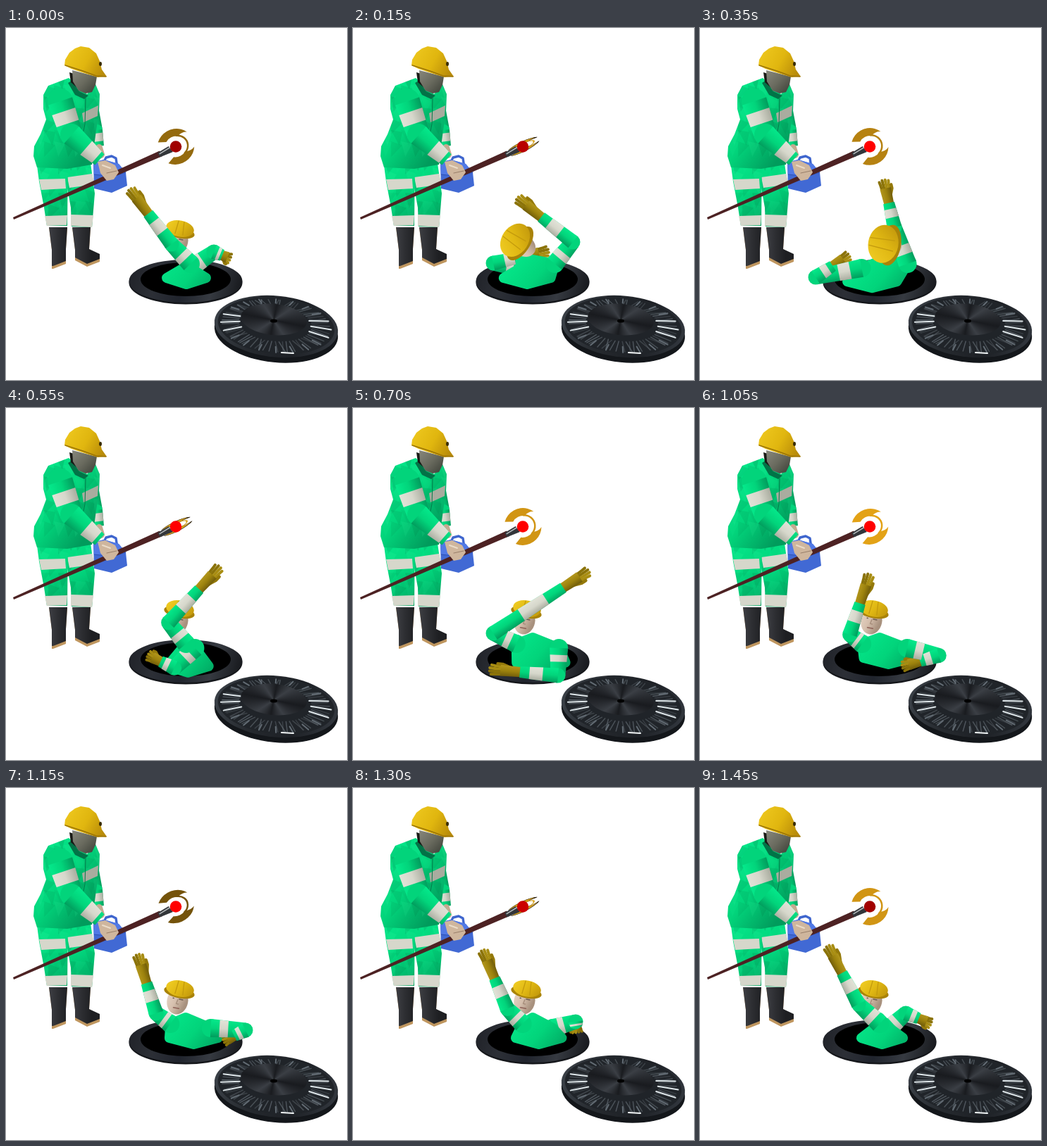
An HTML page with a canvas that plays this animation: 484x500 px, repeating every 1500 ms.

```html
<!DOCTYPE html>
<html lang="en">
<head>
<meta charset="utf-8">
<title>Manhole</title>
<style>
html, body { margin: 0; width: 100%; height: 100%; overflow: hidden; background: #fff; }
canvas { display: block; width: 484px; height: 500px; }
</style>
</head>
<body>
<canvas id="stage" width="484" height="500"></canvas>
<script>
const LOOP = 1500, STEP = 50, TAU = Math.PI * 2;
const GREEN = ['#04e98b', '#02d47b', '#019b5c'];
const TAPE = ['#e2e3d8', '#d6d7cb', '#a9ac9f'];
const stage = document.getElementById('stage').getContext('2d');
const still = document.createElement('canvas');
still.width = 484;
still.height = 500;
let c = still.getContext('2d');

// ---- helpers ----
const points = s => s.split(' ').map(p => p.split(',').map(Number));
const mix = (a, b, k) => a.map((v, i) => v + (b[i] - v) * k);
const dist = (a, b) => Math.hypot(b[0] - a[0], b[1] - a[1]);

function seeded(seed) {
  return () => (seed = (seed * 16807) % 2147483647) / 2147483647;
}
function trace(pts) {
  c.beginPath();
  (typeof pts === 'string' ? points(pts) : pts).forEach(p => c.lineTo(p[0], p[1]));
}
function poly(fill, pts) {
  c.fillStyle = fill;
  trace(pts);
  c.closePath();
  c.fill();
}
function line(color, width, pts) {
  c.strokeStyle = color;
  c.lineWidth = width;
  c.lineCap = c.lineJoin = 'round';
  trace(pts);
  c.stroke();
}
function oval(fill, x, y, rx, ry, rot = 0) {
  c.fillStyle = fill;
  c.beginPath();
  c.ellipse(x, y, rx, ry, rot, 0, TAU);
  c.fill();
}
function linear(x0, y0, x1, y1, colors) {
  const g = c.createLinearGradient(x0, y0, x1, y1);
  colors.forEach((col, i) => g.addColorStop(i / (colors.length - 1), col));
  return g;
}
// Shaded cloth with faint low-poly facets.
function cloth(pts, x0, y0, x1, y1) {
  const rnd = seeded(77);
  poly(linear(x0, y0, x1, y1, GREEN), pts);
  c.save();
  trace(pts);
  c.clip();
  for (let y = y0 - 20; y < y1 + 20; y += 16) {
    for (let x = x0 - 10; x < x1 + 20; x += 14) {
      const tone = rnd() < 0.6 ? '0,70,40' : '60,255,170';
      poly(`rgba(${tone},${rnd() * 0.16})`, [[x, y], [x + 16, y + 8 * rnd()], [x + 12 * rnd(), y + 22]]);
    }
  }
  c.restore();
}
// Tapered segment, lit from the upper left.
function tube(a, b, wa, wb, colors) {
  const len = dist(a, b) || 1;
  let nx = (a[1] - b[1]) / len, ny = (b[0] - a[0]) / len;
  if (nx + 2 * ny > 0) { nx = -nx; ny = -ny; }
  const off = (p, w) => [p[0] + nx * w, p[1] + ny * w];
  poly(linear(...off(a, wa), ...off(a, -wa), colors), [off(a, wa), off(b, wb), off(b, -wb), off(a, -wa)]);
}
// Sleeve with reflective tape: upper and lower give its place along each half.
function sleeve(s, e, w, [ws, we, ww], upper, lower) {
  oval(GREEN[1], ...s, ws, ws);
  tube(s, e, ws, we, GREEN);
  oval(GREEN[1], ...e, we, we);
  tube(e, w, we, ww, GREEN);
  for (const [a, b, wa, wb, part] of [[s, e, ws, we, upper], [e, w, we, ww, lower]]) {
    const width = k => wa + (wb - wa) * k;
    if (part) tube(mix(a, b, part[0]), mix(a, b, part[1]), width(part[0]), width(part[1]), TAPE);
  }
}

// ---- still parts ----
function drawHole() {
  oval('#15171b', 255, 362, 80.5, 30.5);
  oval(linear(175, 340, 330, 385, ['#202228', '#2c2f36', '#20242d', '#363a41', '#17191d']), 255, 359.5, 80.5, 30.5);
  oval('#000', 255, 357, 64, 24);
}

function drawLid() {
  const x = 383.5, y = 424, rot = 0.1, rnd = seeded(9);
  const at = (a, r) => [x - 3 * (1 - r) + Math.cos(a) * 87 * r, y - 9 * (1 - r) + (Math.sin(a) * 42 + Math.cos(a) * 6) * r];
  oval('#14171b', x, y + 8, 88, 43, rot);
  oval(linear(296, 400, 470, 450, ['#3b4148', '#262a2f', '#1d2025', '#33383f']), x, y, 88, 43.5, rot);
  oval('#202429', x, y - 1, 83, 40, rot);
  for (let i = 0; i < 64; i++) {
    const a = i / 64 * TAU, lean = (rnd() - 0.5) * 0.25;
    line(`rgba(120,130,138,${0.2 + 0.35 * rnd()})`, 1.5, [at(a, 0.6), at(a + lean, 0.88)]);
  }
  for (let i = 0; i < 20; i++) {
    const a = i / 20 * TAU, bright = Math.abs(Math.cos(a)) > 0.94;
    line(bright ? '#dfe7ea' : '#626b73', 2, [at(a, bright ? 0.58 : 0.74), at(a, 0.9)]);
  }
  line('#f2f6f7', 2, '391,461 408,462');
  const g = c.createConicGradient(0.2, 380, 415);
  for (let i = 0; i <= 8; i++) g.addColorStop(i / 8, i % 2 ? '#3b3f45' : '#191b1f');
  oval(g, 380, 414, 47, 22, rot);
  oval('#000', 380, 416, 5, 2.6);
}

function drawBoot(x, base, toe) {
  const shape = dy => [[x, 283], [x + 26, 283], [x + 24, 314], [x + 24 + toe, base - 14 + dy], [x + 24 + toe, base - 7 + dy],
    [x + 6 + toe, base + dy], [x + 4, base - toe * 0.6 + dy], [x + 4, 315]];
  poly('#bf965f', shape(4));
  poly(linear(x, 0, x + 28, 0, ['#3d3e43', '#2c2d31', '#1e1f22']), shape(0));
}

function drawWorker() {
  drawBoot(61, 338, 0);
  drawBoot(94, 335, 15);
  cloth('84,185 119,185 126,235 122,283 93,282 92,255 86,222', 80, 185, 130, 283);
  poly(TAPE[1], '87,212 122,207 126,222 90,227');
  poly(TAPE[1], '92,265 124,266 122,283 92,281');
  cloth('42,180 88,180 87,281 58,281 54,255 47,218', 42, 190, 105, 281);
  poly(TAPE[1], '47,215 84,214 85,228 50,230');
  poly(TAPE[1], '55,267 87,266 86,280 58,281');

  // far arm and tool box
  sleeve([124, 118], [129, 145], [132, 168], [8, 8, 7], null, [0.2, 0.7]);
  line('#c5aa91', 10, '132,170 135,180');
  line('#3f66ce', 3.4, '139,190 142,184 150,182 156,185 158,198');
  poly('#4169d4', '124,191 139,187 160,193 170,205 172,224 150,234 125,228');
  poly('#5179e6', '124,191 139,187 160,193 170,205 151,211 125,208');
  line('#2f51b4', 1, '125,208 151,211 170,205');

  cloth('89,71 60,82 53,95 53,115 57,130 49,151 40,168 39,182 44,198 87,200 122,194 124,176 128,145 132,118 133,94 127,80 115,94', 50, 85, 138, 150);
  poly(TAPE[2], '108,121 131,110 130,125 110,134');
  poly('#027347', '93,75 104,90 117,96 111,101 98,95 88,78');
  line('#017a49', 1, '113,100 112,137 104,172');

  // head
  poly('#191a16', '90,63 100,66 101,85 92,77');
  poly(linear(95, 62, 126, 92, ['#85857a', '#696a5e', '#3f423a']), '94,60 129,69 127,81 122,91 113,93 103,89 95,76');
  poly(linear(88, 36, 138, 64, ['#ecc51c', '#e0b60f', '#b88b09']),
    '83,53 84,45 90,35 98,29 106,26 118,28 128,36 133,47 136,59 143,69 130,70 111,64 93,58');
  line('#9b7407', 1.5, '84,53 109,61 128,68 142,69');
  oval('#3a2d05', 134, 51, 2, 3);

  sleeve([77, 104], [93, 152], [133, 187], [18, 16, 10], [0.3, 0.66], [0.52, 0.9]);

  // staff and hand
  poly(linear(0, 0, 3, 7, ['#6b3836', '#4d2223']), '10,269 218,174.5 222,182 11,272');
  poly('#cfb69d', '130,190 141,188 155,195 160,205 153,215 143,217 134,206');
  line('#9b806c', 1.2, '143,206 157,203');
  line('#eadbc8', 2, '137,195 148,199');
}

// ---- staff head: two turns a loop, flashing as a face swings past ----
function drawStaffHead(t) {
  const spin = (t - 337) / 750 * TAU, turn = Math.cos(spin), edgeOn = Math.abs(turn) < 0.4;
  const lit = 0.62 + 0.33 * Math.sin(-2 * spin + 0.6);
  const gold = edgeOn ? '#d9a21a' : `rgb(${[245, 175, 24].map(v => v * lit | 0)})`;
  const glow = Math.min(255, 290 - 130 * Math.cos(t / LOOP * TAU));
  c.save();
  c.translate(241, 168.5);
  c.rotate(-0.46);
  c.save();
  c.scale(1, Math.max(Math.abs(turn), 0.26));
  for (const side of [-1, 1]) {
    c.save();
    c.scale(1, side);
    c.fillStyle = gold;
    c.beginPath();
    c.arc(0, 0, 26.5, 2.42, 0.48, true);
    c.quadraticCurveTo(18, 16, 9, 13);
    c.arc(0, 0, 15.5, 0.95, 2.2);
    c.fill();
    if (edgeOn) {
      c.strokeStyle = '#1d1302';
      c.lineWidth = 2;
      c.stroke();
    }
    c.restore();
  }
  c.strokeStyle = gold;
  c.lineWidth = 2.5;
  c.beginPath();
  c.arc(2, 0, 15.5, -1.2, 1.2);
  c.stroke();
  c.restore();
  poly('#33363a', '-27,-3.5 -9,-5 -7,5 -27,3.5');
  line('#b4b9bb', 1.5, '-25,-1 -9,-2.5');
  c.restore();
  oval(`rgb(${glow < 255 ? Math.max(160, glow) | 0 : 255},0,0)`, 241, 168.5, 8.3, 8.3);
}

// ---- climber ----
// Key points of both arms: raised elbow and fingertip, lowered elbow and fingertip.
const REACH = [
  [0, '235,307 174,227 295,318 319,328'],
  [150, '312,304 231,240 199,334 280,316'],
  [350, '276,283 260,214 164,354 213,322'],
  [700, '199,320 337,230 291,380 191,371'],
  [900, '212,325 333,233 338,364 248,381'],
  [1150, '213,320 186,234 340,344 308,360'],
  [1450, '225,307 180,222 292,320 329,335']
].map(([at, pts]) => ({ at, pts: points(pts) }));

function reach(t) {
  const i = REACH.findLastIndex(k => k.at <= t), a = REACH[i], b = REACH[(i + 1) % REACH.length];
  const k = (t - a.at) / ((b.at || LOOP) - a.at), ease = (k + k * k * (3 - 2 * k)) / 2;
  return a.pts.map((p, j) => mix(p, b.pts[j], ease));
}

function drawGlove(w, tip) {
  const dx = tip[0] - w[0], dy = tip[1] - w[1], len = dist(w, tip);
  const at = (u, v) => [w[0] + dx * u - dy / len * v, w[1] + dy * u + dx / len * v];
  for (let i = -1.5; i < 2; i++) {
    line(i % 1 > 0 ? '#a88d12' : '#8b7309', 4, [at(0.5, i * 3.4), at(0.78, i * 4), at(0.96 - Math.abs(i) * 0.05, i * 4.4)]);
  }
  line('#94790a', 4.5, [at(0.3, 5), at(0.55, 9), at(0.7, 9)]);
  tube(at(-0.05, 0), at(0.6, 0), 7, 8, ['#b0941a', '#9c820d', '#75600a']);
}

function drawArm(shoulder, elbow, tip) {
  const len = dist(elbow, tip), wrist = mix(tip, elbow, Math.min(46 / len, 0.5));
  drawGlove(wrist, tip);
  sleeve(shoulder, elbow, wrist, [13, 10.5, 8], [0.25, 0.5], [0.4, 0.75]);
}

function drawHead(x, y, tilt, back) {
  const rx = 20 + 8 * back, ry = 11.5 + 11 * back, down = 18 * (1 - 0.8 * back ** 3);
  c.save();
  c.translate(x, y);
  c.rotate(tilt);
  oval(linear(-14, 0, 15, 8, ['#e6d3c3', '#d6c0ae', '#a8917e']), 0, down, 15, 19);
  if (!back) {
    for (const side of [-1, 1]) line('#6b5a4e', 1.5, [[side * 4 - 2, 15], [side * 7, 15]]);
    line('#a58d7b', 1.4, '0,16 -1,22 2,22');
    line('#8e6258', 1.5, '-4,28 4,28');
  }
  oval('#a98308', 0, ry * 0.45, rx + 2, ry * 0.72);
  oval(linear(-rx, -ry, rx, ry, ['#f2cf27', '#e0b813', '#bd920b']), 0, 0, rx, ry);
  for (const side of [-1, 1]) line('#c39a0d', 1.3, [[side * rx * 0.28, ry * 0.7], [side * rx * 0.2, -ry * 0.9]]);
  c.restore();
}

// The body turns once a loop, quicker while the back is shown.
function drawClimber(t) {
  const w = t / LOOP * TAU, yaw = w + 0.61 * (1 - Math.cos(w));
  const sin = Math.sin(yaw), cos = Math.cos(yaw), back = Math.max(0, sin);
  const shoulder = [262 + 36 * sin, 335], other = [262 - 36 * sin, 341];
  const head = [247 - 34 * back * cos, 285 + 24 * back];
  const hip = [256 - 13 * sin, 355 + 12 * Math.max(0, -cos)], wide = 28 + 8 * Math.abs(sin);
  const [elbow, tip, lowElbow, lowTip] = reach(t);
  const raised = () => drawArm(shoulder, elbow, tip);
  const lowered = () => drawArm(other, lowElbow, lowTip);
  const lowInFront = cos < 0.62, raisedBehind = sin > 0.7;

  if (!lowInFront) lowered();
  const [left, right] = sin > 0 ? [other, shoulder] : [shoulder, other];
  const body = [left, [head[0] + 8, 326], right, [hip[0] + wide, hip[1]], [hip[0], hip[1] + 9], [hip[0] - wide, hip[1]]];
  const shade = linear(225, 320, 300, 385, GREEN);
  poly(shade, body);
  line(shade, 14, [...body, left]);
  if (lowInFront) lowered();
  if (raisedBehind) raised();
  drawHead(...head, 0.2 - 1.75 * back, back);
  if (!raisedBehind) raised();
}

// ---- run ----
c.fillStyle = '#fff';
c.fillRect(0, 0, 484, 500);
drawHole();
drawLid();
drawWorker();
c = stage;

const start = performance.now();
function frame() {
  const t = Math.floor((performance.now() - start) % LOOP / STEP) * STEP;
  c.drawImage(still, 0, 0);
  drawStaffHead(t);
  drawClimber(t);
  requestAnimationFrame(frame);
}
frame();
</script>
</body>
</html>
```
